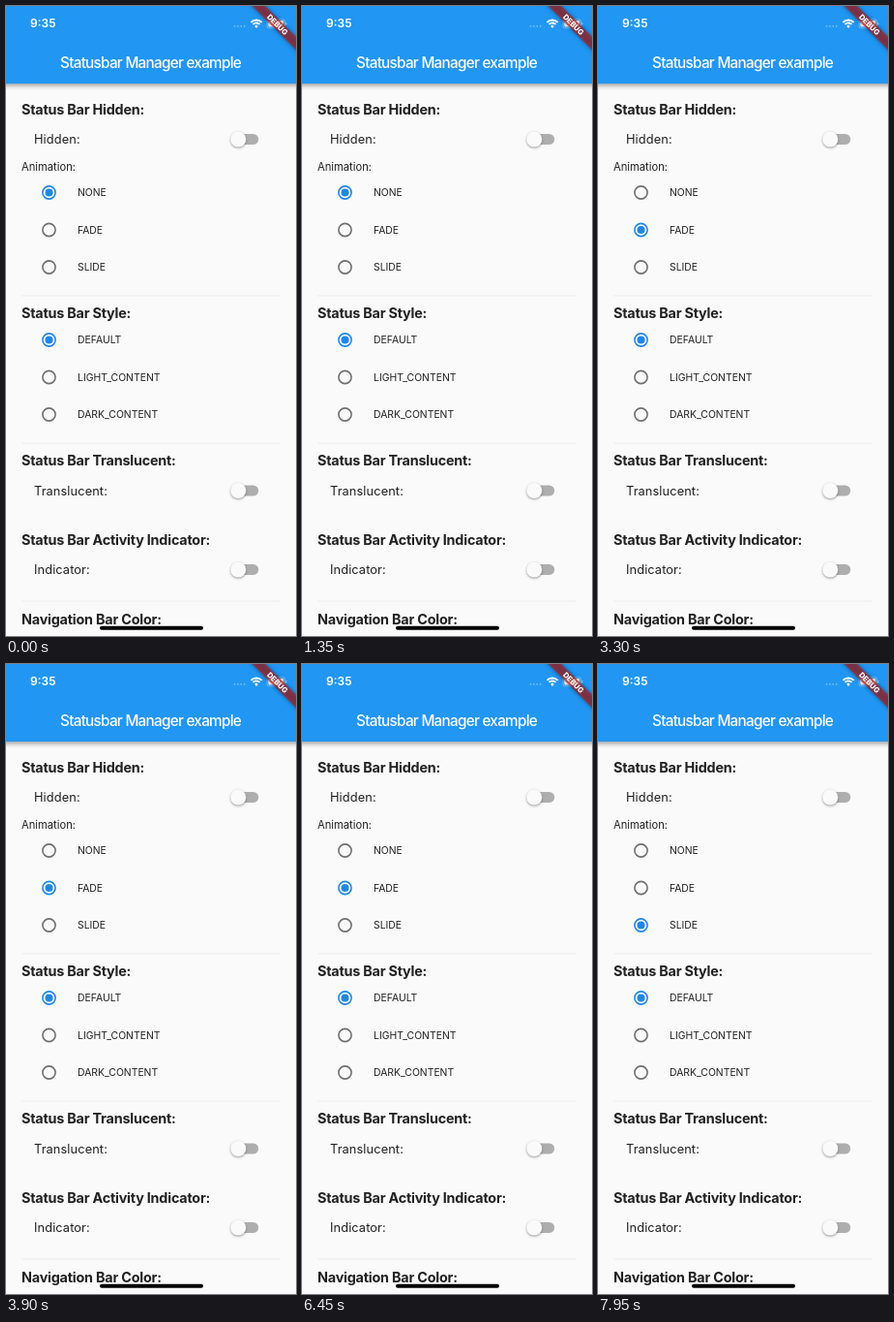
An HTML page with a canvas for the animation above (8 s loop, 300 by 650 pixels).

```html
<!DOCTYPE html>
<html lang="en">
<head>
<meta charset="utf-8">
<title>Statusbar Manager example</title>
<style>
  html, body { margin: 0; width: 100%; height: 100%; overflow: hidden; background: #fafafa; }
  canvas { display: block; width: 300px; height: 650px; }
</style>
</head>
<body>
<canvas id="stage"></canvas>
<script>
const W = 300, H = 650, LOOP = 8000, STEP = 150, TAU = Math.PI * 2;
const canvas = document.getElementById('stage');
const ctx = canvas.getContext('2d');
const dpr = window.devicePixelRatio || 1;
canvas.width = W * dpr;
canvas.height = H * dpr;

const PAGE = '#fafafa', BLUE = '#2196f3', ACCENT = '#1e88e5', INK = '#212121', RING = '#707070';

// The "Hidden" switch is turned on, then off; the status bar returns at `back`.
const CYCLES = [
  { on: 150, off: 600, back: 1050, fade: 1 },
  { on: 4650, off: 5850, back: 6450, fade: 330 }
];
// Radio taps: index of the option and the moment it is pressed.
const TAPS = [{ index: 1, at: 2550 }, { index: 2, at: 6900 }];

const ramp = (t, start, dur) => Math.min(1, Math.max(0, (t - start) / dur));

function hiddenState(t) {
  const c = CYCLES.findLast(c => t >= c.on);
  if (!c) return { pos: 0, row: 0, splash: 0, status: 1 };
  // The interface stalls while the status bar changes.
  if (t >= c.off && t < c.back) t = c.off;
  else if (c.fade > STEP && t > c.on + 300 && t < c.on + 600) t = c.on + 300;
  const pulse = 1 - ramp(t, c.on, 600);
  const release = ramp(t, c.off - 300, 300) * (1 - ramp(t, c.off, 600));
  return {
    pos: ramp(t, c.on, 150) * (1 - ramp(t, c.off - 150, 160)),
    row: t < c.off ? pulse : 0,
    splash: t < c.off ? Math.max(pulse, release) : release,
    status: t >= c.back ? 1 : 1 - ramp(t, c.on, c.fade)
  };
}

function text(str, x, y, size, { weight = 400, color = INK, gap = 0, align = 'left' } = {}) {
  ctx.font = `${weight} ${size}px Inter, Roboto, sans-serif`;
  ctx.letterSpacing = gap + 'px';
  ctx.textAlign = align;
  ctx.fillStyle = color;
  ctx.fillText(str, x, y);
}

function disc(x, y, r, color) {
  ctx.fillStyle = color;
  ctx.beginPath();
  ctx.arc(x, y, r, 0, TAU);
  ctx.fill();
}

function pill(x, y, w, h, r, color) {
  ctx.fillStyle = color;
  ctx.beginPath();
  ctx.roundRect(x, y, w, h, r);
  ctx.fill();
}

function withShadow(color, blur, dy, draw) {
  ctx.save();
  ctx.shadowColor = color;
  ctx.shadowBlur = blur * dpr;
  ctx.shadowOffsetY = dy * dpr;
  draw();
  ctx.restore();
}

const heading = (str, y) => text(str, 16, y + 5, 14.4, { weight: 700, gap: -.22 });

function radio(label, y, on) {
  ctx.strokeStyle = on ? ACCENT : RING;
  ctx.lineWidth = 1.6;
  ctx.beginPath();
  ctx.arc(44.5, y, 6.6, 0, TAU);
  ctx.stroke();
  if (on) disc(44.5, y, 4, ACCENT);
  text(label, 74, y + 3.7, 10.4);
}

function radios(labels, y, picked) {
  labels.forEach((label, i) => radio(label, y + 38.5 * i, i === picked));
}

function toggle(label, y, pos = 0, splash = 0) {
  const x = 240.3 + 15 * pos;
  const tint = a => `rgba(30,136,229,${a * pos})`;
  const track = color => pill(234.8, y - 5.6, 26.4, 11.2, 5.6, color);
  text(label, 29, y + 4.5, 12.8, { gap: .1 });
  if (splash > 0) {
    const color = pos > .5 ? `rgba(60,100,140,${.35 * splash})` : `rgba(0,0,0,${.095 * splash})`;
    disc(x + .5, y + .3, 9 + 14 * splash, color);
  }
  track(`rgba(0,0,0,${.3 * (1 - pos)})`);
  track(tint(.55));
  withShadow('rgba(0,0,0,.4)', 2.5, 1, () => disc(x, y, 8, PAGE));
  disc(x, y, 8, tint(1));
}

function divider(y) {
  ctx.fillStyle = '#ededed';
  ctx.fillRect(16, y, 268, 1);
}

function statusBar(alpha) {
  if (alpha <= 0) return;
  ctx.save();
  ctx.globalAlpha = alpha;
  text('9:35', 25, 22.3, 12, { weight: 600, color: '#fff' });
  for (let i = 0; i < 4; i++) disc(236.5 + i * 3.4, 20.8, .9, 'rgba(255,255,255,.4)');
  ctx.strokeStyle = '#fff';
  ctx.lineWidth = 1.8;
  for (const r of [8, 5]) {
    ctx.beginPath();
    ctx.arc(259, 22.5, r, -Math.PI * .75, -Math.PI * .25);
    ctx.stroke();
  }
  ctx.fillStyle = '#fff';
  ctx.beginPath();
  ctx.moveTo(259, 23);
  ctx.arc(259, 22.5, 2.6, -Math.PI * .75, -Math.PI * .25);
  ctx.fill();
  ctx.strokeStyle = 'rgba(255,255,255,.5)';
  ctx.lineWidth = .8;
  ctx.beginPath();
  ctx.roundRect(270, 13.8, 18.5, 9, 2.4);
  ctx.stroke();
  pill(271.3, 15.1, 15.9, 6.4, 1.4, '#fff');
  pill(289.3, 16.8, 1.2, 3, .6, 'rgba(255,255,255,.5)');
  ctx.restore();
}

function ribbon(color, blur) {
  ctx.filter = blur ? `blur(${blur * dpr}px)` : 'none';
  ctx.fillStyle = color;
  ctx.fillRect(-36, 22.4, 72, 9.6);
}

function banner() {
  ctx.save();
  ctx.translate(W, 0);
  ctx.rotate(Math.PI / 4);
  ribbon('rgba(0,0,0,.45)', 2);
  ribbon('rgba(183,28,28,.63)', 0);
  text('DEBUG', 0, 29.9, 7.7, { weight: 800, color: '#fff', align: 'center' });
  ctx.restore();
}

// Tap feedback on a radio row, 450 ms from press to rest.
function radioTap(t, { index, at }) {
  const p = ramp(t, at, 450), y = 192.5 + 38.5 * index;
  if (t < at || p === 1) return;
  ctx.fillStyle = `rgba(0,0,0,${.07 * (1 - p)})`;
  ctx.fillRect(16, y - 19, 268, 38);
  disc(44.5, y, 10 + 6 * p, `rgba(60,100,140,${.2 * (1 - p)})`);
}

function draw(t) {
  const { pos, row, splash, status } = hiddenState(t);
  ctx.setTransform(dpr, 0, 0, dpr, 0, 0);
  ctx.fillStyle = PAGE;
  ctx.fillRect(0, 0, W, H);

  withShadow('rgba(0,0,0,.4)', 5, 2, () => {
    ctx.fillStyle = BLUE;
    ctx.fillRect(-10, -10, W + 20, 90);
  });
  text('Statusbar Manager example', 56, 63.5, 15.3, { color: '#fff', weight: 500, gap: -.74 });

  ctx.fillStyle = `rgba(0,0,0,${.08 * row})`;
  ctx.fillRect(16, 116, 268, 43);

  heading('Status Bar Hidden:', 107);
  toggle('Hidden:', 137.5, pos, splash);

  text('Animation:', 16, 170.3, 11.2);
  TAPS.forEach(tap => radioTap(t, tap));
  const last = TAPS.findLast(tap => t >= tap.at + STEP);
  radios(['NONE', 'FADE', 'SLIDE'], 192.5, last ? last.index : 0);
  divider(298.5);

  heading('Status Bar Style:', 317.3);
  radios(['DEFAULT', 'LIGHT_CONTENT', 'DARK_CONTENT'], 344.5, 0);
  divider(450.5);

  heading('Status Bar Translucent:', 469.3);
  toggle('Translucent:', 500);
  heading('Status Bar Activity Indicator:', 551.3);
  toggle('Indicator:', 581.5);
  divider(613.5);
  heading('Navigation Bar Color:', 632.5);

  statusBar(status);
  banner();
  pill(97, 639.7, 107, 4, 2, '#000');
}

const begin = performance.now();
function tick() {
  const t = (performance.now() - begin) % LOOP;
  draw(Math.floor(t / STEP) * STEP);
  requestAnimationFrame(tick);
}
tick();
</script>
</body>
</html>
```
